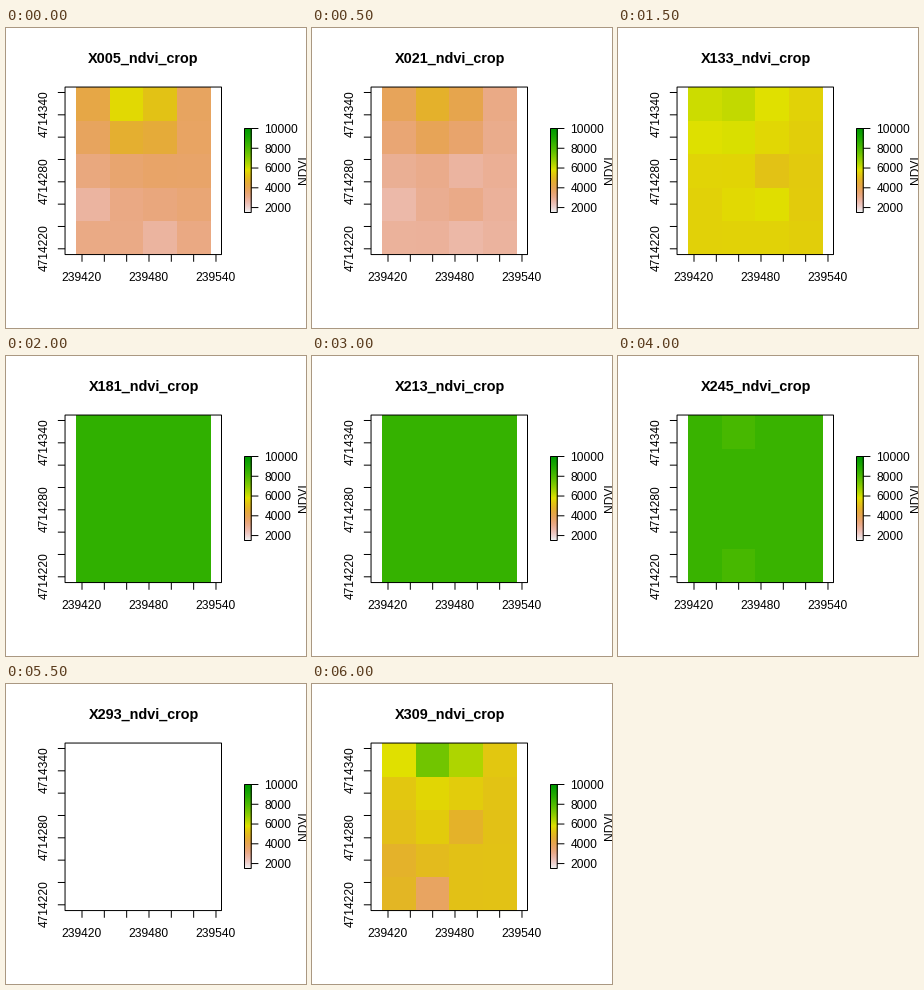
Animation of 300 by 300 pixels, one loop 6500 ms. Source, as a matplotlib script:

```python
import colorsys

import matplotlib.pyplot as plt
import numpy as np
from matplotlib.animation import FuncAnimation
from matplotlib.patches import Rectangle

SIZE = 300
LOW, HIGH = 1500, 10000
GAMMA = 1.2
LEFT, RIGHT, TOP, BOTTOM = 59.04, 215.5, 59.04, 226.56
STEP = 22.33  # pixels per 20 m
TICK = 7.2
BAR = (238.5, 245.2, 100.5, 184.5)  # left, right, top, bottom
ROWS, COLS = np.mgrid[0:5, 0:4]

plt.rcParams["font.family"] = "Liberation Sans"
plt.rcParams["font.size"] = 12


def ramp(value):
    """Terrain palette: white, tan, yellow, green from low to high."""
    u = 2 * (HIGH - value) / (HIGH - LOW)
    if u <= 1:
        h, s, v = (2 - u) / 6, 1, 0.65 + 0.25 * u
    else:
        w = min(u - 1, 1)
        h, s, v = (1 - w) / 6, 1 - w, 0.9 + 0.05 * w
    return [c ** GAMMA for c in colorsys.hsv_to_rgb(h, s, v)]


def field(base, *bumps):
    """Even ground plus Gaussian bumps (row, column, height, spread)."""
    grid = np.full(ROWS.shape, float(base))
    for row, col, height, spread in bumps:
        dist = (ROWS - row) ** 2 + (COLS - col) ** 2
        grid += height * np.exp(-dist / spread)
    return grid


winter = field(3150, (0, 1.3, 2600, 1.8), (2, 3, 350, 1.8),
               (3, 0, -500, 0.5), (4, 2, -500, 0.5))
spring = field(2400, (0, 0.7, 1400, 1.8), (2, 2, -650, 0.3),
               (3, 1.7, 750, 0.6), (2.5, 3.3, -300, 3))
summer = field(8550)
dense = field(8450)
late_summer = field(8350, (0, 1, -270, 0.1), (4, 1, -270, 0.1))
autumn = field(7800, (0.5, 3.2, 300, 0.8), (1, 1, 400, 0.3),
               (2, 2.35, -850, 0.5), (4, 3, 550, 0.8), (4, 0, 350, 0.3))
leaf_fall = field(5150, (-0.4, 1.2, 2600, 1.1), (3.3, 0, -500, 1),
                  (4, 1, -1350, 0.2), (2, 2, -450, 0.3), (2, 1, 250, 0.3))

# Every 16 days from midsummer on; None is a date without data.
DAYS = [5, 21, 85, 133, *range(181, 310, 16)]
GRIDS = [winter, (winter + spring) / 2, spring, (spring + summer) / 2,
         summer, summer, dense, dense, late_summer, autumn,
         None, None, leaf_fall]

fig = plt.figure(figsize=(SIZE / 72, SIZE / 72), dpi=72, facecolor="white")
ax = fig.add_axes([0, 0, 1, 1])
ax.axis("off")


def line(x0, y0, x1, y1):
    ax.plot([x0, x1], [y0, y1], color="black", lw=1,
            solid_capstyle="butt", snap=False)


def label(x, y, text, ha="center", rotation=0, **style):
    return ax.text(x, y, text, ha=ha, va="baseline", rotation=rotation,
                   rotation_mode="anchor", **style)


def box(x0, x1, y0, y1):
    ax.add_patch(Rectangle((x0, y0), x1 - x0, y1 - y0, fill=False,
                           ec="black", lw=1, zorder=3, snap=False))


def colour_image(grid, x0, x1, y0, y1):
    return ax.imshow(colours(grid), extent=(x0, x1, y1, y0),
                     interpolation="nearest", aspect="auto")


def colours(grid):
    return np.array([[ramp(v) for v in row] for row in grid])


cells = colour_image(winter, 70.1, 204.3, TOP, BOTTOM)
box(LEFT, RIGHT, TOP, BOTTOM)

for i in range(7):
    x = 76 + i * STEP
    line(x, BOTTOM, x, BOTTOM + TICK)
    if i % 3 == 0:
        label(x - 0.5, 252.7, str(239420 + 20 * i))

for i in range(8):
    y = 220.8 - i * STEP
    line(LEFT - TICK, y, LEFT, y)
    if i % 3 == 0 and i < 7:
        label(42, y - 0.8, str(4714220 + 20 * i), rotation=90)

x0, x1, y0, y1 = BAR
colour_image(np.linspace(HIGH, LOW, 255)[:, None], *BAR)
box(*BAR)
for v in range(2000, 10001, 2000):
    y = y0 + (HIGH - v) / (HIGH - LOW) * (y1 - y0)
    line(x1, y, x1 + TICK, y)
    label(258.5, y + 4.3, str(v), ha="left")
label(300.6, 142, "NDVI", rotation=90)

title = label(137.6, 34.7, "", fontsize=14.4, fontweight="bold")
ax.set_xlim(0, SIZE)
ax.set_ylim(SIZE, 0)


def update(i):
    title.set_text(f"X{DAYS[i]:03d}_ndvi_crop")
    grid = GRIDS[i]
    cells.set_visible(grid is not None)
    if grid is not None:
        cells.set_data(colours(grid))
    return title, cells


anim = FuncAnimation(fig, update, frames=len(DAYS), interval=500,
                     repeat=True, repeat_delay=0)
plt.show()
```
